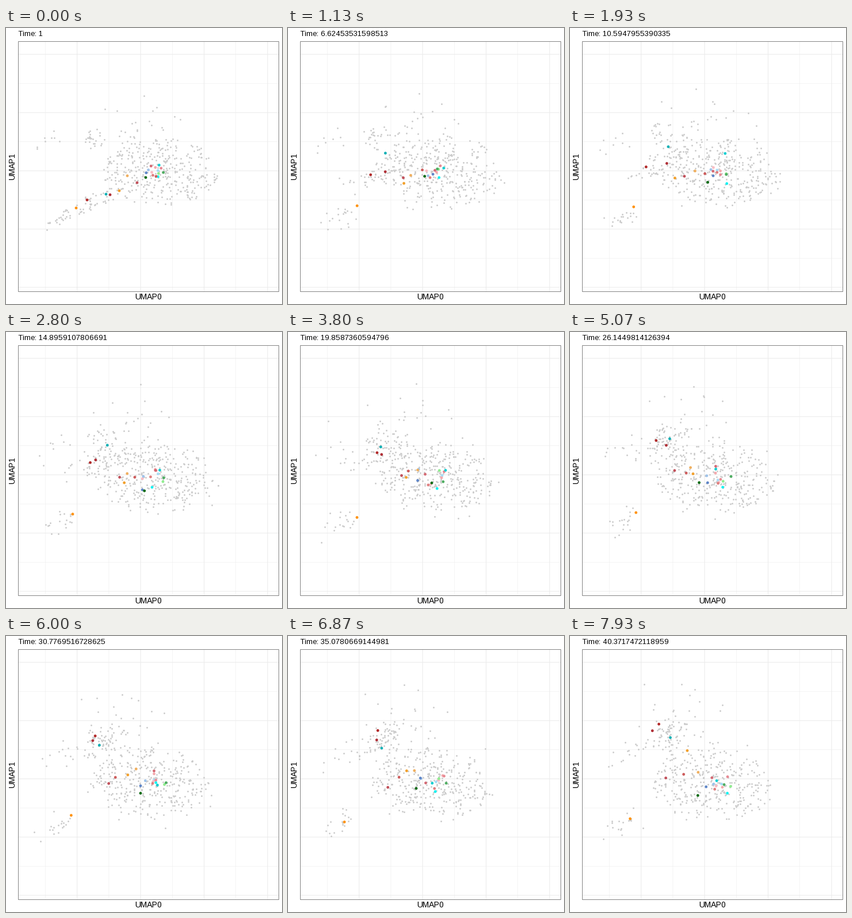
Write a matplotlib script that moves like this. It is 480 px wide and 480 px high and loops after 8 s.

```python
import matplotlib.pyplot as plt
import numpy as np
from matplotlib.animation import FuncAnimation

plt.rcParams["text.hinting_factor"] = 1

STATES, LOOP, TICK = 120, 8000, 20
STEP = 89 / 269                 # time units per state
PT = 0.75                       # points per pixel at 96 dpi
LAST = 42                       # whole time points needed
rng = np.random.default_rng(11)

# count, start, end, spread, slope, pace
GROUPS = [
    (320, (268, 250), (246, 258), (48, 28), 0, 1),
    (45, (150, 303), (160, 172), (26, 8), -0.4, 0.5),
    (18, (92, 333), (92, 326), (15, 6), -0.55, 1),
    (24, (153, 195), (180, 175), (9, 12), 0, 1),
    (30, (240, 203), (205, 190), (24, 20), 0, 0.6),
    (8, (66, 191), (85, 205), (14, 10), 0, 1),
    (12, (235, 150), (190, 110), (40, 18), 0, 1),
]

# coloured dots that stay near the middle of the cloud
HUB = ["#a9dcf5", "#f9bcc4", "#f4a9ad", "#90ee90", "#9fc3ea", "#e88a94",
       "#e07f7f", "#d46a74", "#4fae62", "#5f86c8", "#10cfd2", "#12f2f2"]

# coloured dots that travel: colour, start, end, pace
MOVERS = [
    ("#f0b060", (211, 257), (222, 230), 1),
    ("#0b6b12", (243, 260), (220, 266), 1),
    ("#f2a02c", (197, 283), (207, 235), 0.5),
    ("#cd5c5c", (261, 258), (192, 240), 0.4),
    ("#c2505a", (228, 269), (177, 245), 0.4),
    ("#0fb0b5", (174, 289), (168, 172), 0.3),
    ("#b03038", (181, 290), (151, 168), 0.6),
    ("#b22a2a", (141, 299), (154, 148), 0.7),
    ("#ff930f", (122, 313), (110, 317), 1),
]


def disc(n):
    """Offsets in a round patch with unit spread, denser in the middle."""
    a = rng.uniform(0, 2 * np.pi, n)
    r = 2.1 * rng.uniform(0, 1, n) ** 0.6
    return np.column_stack([r * np.cos(a), r * np.sin(a)])


def wander(n, size, keep=0.6):
    """Correlated jitter at every whole time point, starting at rest."""
    kicks = rng.standard_t(5, (LAST, n, 2)) * size * np.sqrt(1 - keep ** 2)
    out = np.zeros_like(kicks)
    for k in range(1, LAST):
        out[k] = keep * out[k - 1] + kicks[k]
    return out


class Swarm:
    def __init__(self, start, end, pace, size):
        self.start, self.end = np.array(start, float), np.array(end, float)
        self.pace = np.reshape(pace, (-1, 1))
        self.noise = wander(len(self.start), size)

    def at(self, i):
        k, f = divmod(i * STEP, 1)
        k = int(k)
        ease = (i / (STATES - 1)) ** self.pace
        shake = self.noise[k] * (1 - f) + self.noise[k + 1] * f
        return self.start + (self.end - self.start) * ease + shake


def grey_swarm():
    start, end, pace = [], [], []
    for n, a, b, spread, slope, p in GROUPS:
        off = disc(n) * spread
        off[:, 1] += slope * off[:, 0]
        start.append(off + a)
        end.append(off + b)
        pace += [p] * n
    return Swarm(np.concatenate(start), np.concatenate(end), pace, 7)


def color_swarm():
    turn = np.arange(len(HUB)) * 2.4
    reach = np.sqrt((np.arange(len(HUB)) + 1) / len(HUB))
    home = np.column_stack([259 + 18 * reach * np.cos(turn),
                            248 + 11 * reach * np.sin(turn)])
    start = np.vstack([home, [m[1] for m in MOVERS]])
    end = np.vstack([home + [-2, 7], [m[2] for m in MOVERS]])
    pace = [1] * len(HUB) + [m[3] for m in MOVERS]
    return Swarm(start, end, pace, 6)


fig = plt.figure(figsize=(5, 5), dpi=96, facecolor="white")
ax = fig.add_axes([0, 0, 1, 1])
ax.set(xlim=(0, 480), ylim=(480, 0))
ax.axis("off")

# panel with alternating thin and full grid lines
LEFT, RIGHT, TOP, BOTTOM = 21.5, 474.5, 23.5, 458.5


def grid(first, gap, count, thin, vertical):
    for n in range(count):
        p = first + gap * n
        width = 0.53 if n % 2 == thin else 1.07
        ends = ([p, p], [TOP, BOTTOM]) if vertical else ([LEFT, RIGHT], [p, p])
        ax.plot(*ends, color="#ebebeb", lw=width * PT, snap=False, zorder=1)


grid(68.5, 55.2, 8, 0, True)
grid(45.8, 50.65, 9, 1, False)
ax.add_patch(plt.Rectangle((LEFT, TOP), RIGHT - LEFT, BOTTOM - TOP, fill=False,
                           ec="#858585", lw=PT, snap=False, zorder=5))


def dots(n, radius, color, z):
    return ax.scatter(np.zeros(n), np.zeros(n), s=(2 * radius * PT) ** 2,
                      c=color, linewidths=0, zorder=z)


def label(x, y, text, px, **kw):
    return ax.text(x, y, text, fontsize=px * PT, family="Liberation Sans",
                   color="black", va="baseline", rotation_mode="anchor", **kw)


grey, marked = grey_swarm(), color_swarm()
colors = HUB + [m[0] for m in MOVERS]
grey_dots = dots(len(grey.start), 1.45, "#cccccc", 3)
color_dots = dots(len(colors), 2.4, colors, 4)
title = label(21, 14, "", 13)
label(248, 472, "UMAP0", 14, ha="center")
label(15, 240, "UMAP1", 14, ha="center", rotation=90)


def draw(tick):
    # states last 200/3 ms, changing on the nearest tick
    i = (tick * TICK + 14) * STATES // LOOP
    title.set_text(f"Time: {1 + i * 89 / 269:.15g}")
    grey_dots.set_offsets(grey.at(i))
    color_dots.set_offsets(marked.at(i))
    return title, grey_dots, color_dots


anim = FuncAnimation(fig, draw, frames=LOOP // TICK, interval=TICK,
                     repeat=True, repeat_delay=0, blit=False)
plt.show()
```
